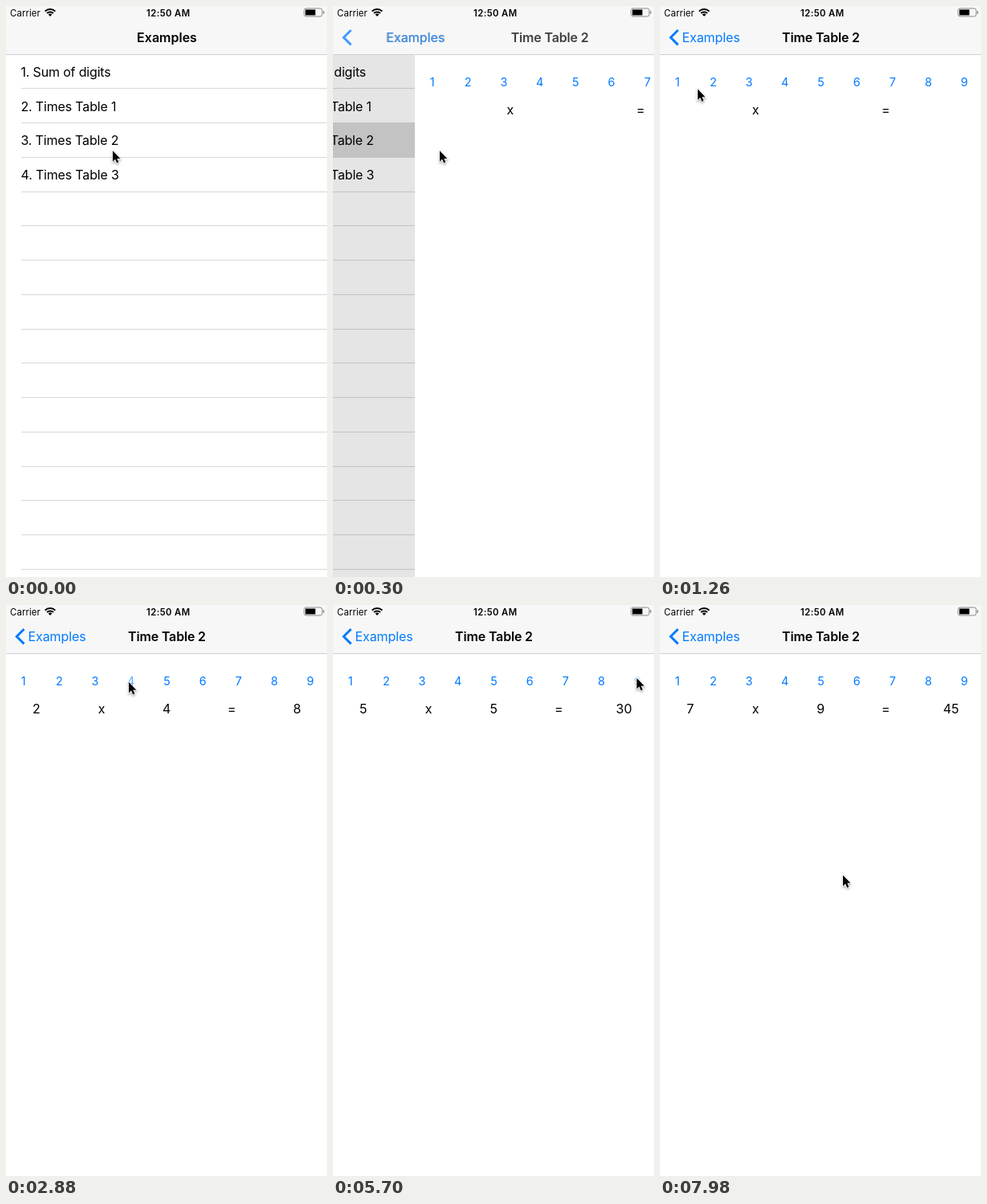
Write an HTML page with a canvas that moves like this. It is 400 px wide and 711 px high and loops after 8 s.

```html
<!DOCTYPE html>
<html lang="en">
<head>
<meta charset="utf-8">
<title>Times table app</title>
<style>
  html, body { margin: 0; width: 100%; height: 100%; overflow: hidden; background: #fff; }
  canvas { display: block; width: 400px; height: 711px; }
</style>
</head>
<body>
<canvas id="stage"></canvas>
<script>
const W = 400, H = 711, LOOP = 8000, STEP = 60;
const BAR = 60.3, ROW = 42.75, BLUE = '#007aff';
const PUSH_START = 154, FADE = 450;
const ROWS = ['1. Sum of digits', '2. Times Table 1', '3. Times Table 2', '4. Times Table 3'];

// Pointer stops: time, x, y
const PATH = [
  [0, 133, 180.2], [660, 133, 180.2], [960, 72, 138], [1260, 47, 103.5],
  [1500, 65, 96], [1860, 65, 96], [2500, 153, 96], [3360, 153, 96],
  [3600, 243, 94], [3780, 243, 94], [4140, 202, 93], [5160, 202, 93],
  [5640, 378.5, 91], [5980, 378.5, 91], [6360, 288, 92], [7160, 288, 92],
  [7980, 228, 336.5]
];

// Button taps: digit, press, release
const TAPS = [
  [2, 1560, 1680], [4, 2540, 2640], [6, 3600, 3690], [5, 4200, 4320],
  [5, 4740, 4860], [9, 5640, 5760], [7, 6480, 6570]
];

const canvas = document.getElementById('stage');
const ctx = canvas.getContext('2d');
const dpr = window.devicePixelRatio || 1;
canvas.width = W * dpr;
canvas.height = H * dpr;

const clamp = v => Math.max(0, Math.min(1, v));
const smooth = v => v * v * (3 - 2 * v);

function text(str, x, y, { size = 16, weight = 400, color = '#000', align = 'left', spacing = 0, alpha = 1 } = {}) {
  ctx.globalAlpha = alpha;
  ctx.font = `${weight} ${size}px Inter, sans-serif`;
  ctx.letterSpacing = spacing + 'px';
  ctx.textAlign = align;
  ctx.fillStyle = color;
  ctx.fillText(str, x, y);
  ctx.globalAlpha = 1;
}

function rect(x, y, w, h, color) {
  ctx.fillStyle = color;
  ctx.fillRect(x, y, w, h);
}

// Critically damped spring used for the page push
function pushProgress(t) {
  if (t < PUSH_START) return 0;
  const s = 18.26 * (t - PUSH_START) / 1000;
  return s > 9 ? 1 : 1 - (1 + s) * Math.exp(-s);
}

function pointerAt(t) {
  const next = PATH.findIndex(p => p[0] > t);
  if (next < 0) return PATH[PATH.length - 1].slice(1);
  const [t0, x0, y0] = PATH[next - 1], [t1, x1, y1] = PATH[next];
  const k = smooth((t - t0) / (t1 - t0));
  return [x0 + (x1 - x0) * k, y0 + (y1 - y0) * k];
}

// Taps alternate between the two factors; the product follows the second one
function equationAt(t) {
  let a = '', b = '', product = '';
  TAPS.forEach(([digit, , release], i) => {
    if (t < release) return;
    if (i % 2) { b = digit; product = a * b; } else a = digit;
  });
  return [a, 'x', b, '=', product];
}

function buttonAlpha(digit, t) {
  let alpha = 1;
  for (const [d, press, release] of TAPS) {
    if (d !== digit || t < press) continue;
    alpha = t < release ? 0.2 : 0.2 + 0.8 * clamp((t - release) / FADE);
  }
  return alpha;
}

function drawList(t, p) {
  ctx.save();
  ctx.translate(-0.3 * W * p, 0);
  if (t >= 120) rect(0, BAR + 2 * ROW, W, ROW, '#d9d9d9');
  for (let y = BAR + ROW; y < H; y += ROW) rect(19, Math.round(y - 0.7), W, 1, '#d8d8da');
  ROWS.forEach((label, i) => text(label, 18.5, 87.8 + i * ROW, { spacing: -0.17 }));
  ctx.restore();
  rect(0, BAR, W, H, `rgba(0,0,0,${0.1 * clamp(p / 0.74)})`);
}

function drawTable(t, p) {
  ctx.save();
  ctx.translate(W * (1 - p), 0);
  rect(0, BAR, W, H, '#fff');
  for (let d = 1; d <= 9; d++) {
    text(d, 21.6 + (d - 1) * 44.7, 99.8,
      { size: 14.4, color: BLUE, align: 'center', alpha: buttonAlpha(d, t) });
  }
  equationAt(t).forEach((part, i) => text(part, 37.8 + i * 81.2, 134.7, { align: 'center' }));
  ctx.restore();
}

function drawStatus() {
  text('Carrier', 5, 12.6, { size: 11.3, spacing: 0.15 });
  text('12:50 AM', 202.3, 12.6, { size: 11.3, weight: 600, align: 'center', spacing: 0.4 });

  ctx.strokeStyle = ctx.fillStyle = '#000';
  ctx.lineWidth = 2;
  for (const r of [5.6, 9]) {
    ctx.beginPath();
    ctx.arc(55, 13, r, -Math.PI * 0.75, -Math.PI * 0.25);
    ctx.stroke();
  }
  ctx.beginPath();
  ctx.moveTo(55, 13);
  ctx.arc(55, 13, 3.4, -Math.PI * 0.75, -Math.PI * 0.25);
  ctx.fill();

  ctx.strokeStyle = '#888';
  ctx.lineWidth = 1;
  ctx.beginPath();
  ctx.roundRect(371.5, 3, 22.5, 10, 2.5);
  ctx.stroke();
  rect(395, 6.3, 1.4, 3.4, '#888');
  rect(373, 4.5, 12.5, 7, '#000');
}

function drawBar(p) {
  rect(0, 0, W, 60, '#f7f7f7');
  rect(0, 60, W, 1, '#d0d0d2');
  drawStatus();

  // The old title slides left while it turns into the back label
  const backX = 200.5 - 137 * Math.pow(p, 1.15);
  text('Examples', backX, 45, { weight: 600, align: 'center', alpha: 1 - p });
  if (!p) return;
  text('Examples', backX, 45, { color: BLUE, align: 'center', spacing: -0.1, alpha: p });
  text('Time Table 2', 200.5 + 273 * (1 - p), 45,
    { weight: 600, align: 'center', spacing: -0.17, alpha: p });
  ctx.globalAlpha = p;
  ctx.strokeStyle = BLUE;
  ctx.lineWidth = 2.9;
  ctx.beginPath();
  ctx.moveTo(22.5, 30);
  ctx.lineTo(13.3, 39.2);
  ctx.lineTo(22.5, 48.4);
  ctx.stroke();
  ctx.globalAlpha = 1;
}

function drawPointer([x, y]) {
  const arrow = new Path2D('M0 0V13.5L3.1 10.6L5.2 15.4L7.4 14.4L5.3 9.8H9.4Z');
  ctx.save();
  ctx.translate(x, y);
  ctx.shadowColor = 'rgba(0,0,0,.4)';
  ctx.shadowBlur = 3 * dpr;
  ctx.shadowOffsetY = 1.5 * dpr;
  ctx.strokeStyle = '#fff';
  ctx.lineWidth = 1.5;
  ctx.stroke(arrow);
  ctx.shadowColor = 'transparent';
  ctx.fillStyle = '#000';
  ctx.fill(arrow);
  ctx.restore();
}

function draw(t) {
  const p = pushProgress(t);
  ctx.setTransform(dpr, 0, 0, dpr, 0, 0);
  rect(0, 0, W, H, '#fff');
  if (p < 1) drawList(t, p);
  if (p > 0) drawTable(t, p);
  drawBar(p);
  drawPointer(pointerAt(t));
}

const start = performance.now();
function tick() {
  const t = (performance.now() - start) % LOOP;
  draw(Math.floor(t / STEP) * STEP);
  requestAnimationFrame(tick);
}
tick();
</script>
</body>
</html>
```
